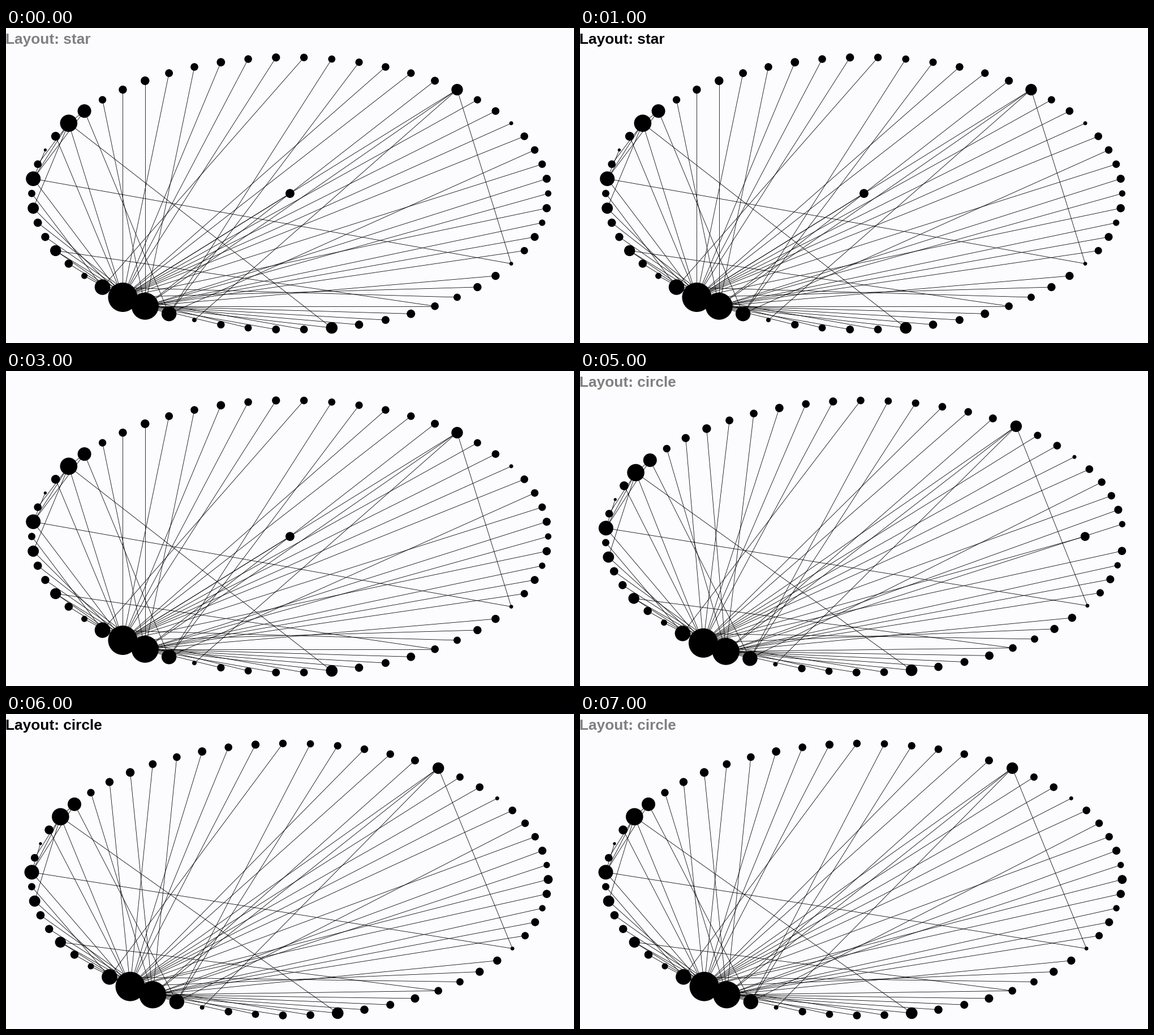
A matplotlib script for the animation above (8000 ms loop, 1004 by 558 pixels).

```python
import matplotlib.pyplot as plt
import numpy as np
from matplotlib.animation import FuncAnimation
from matplotlib.collections import LineCollection

W, H, DPI = 1004, 558, 64
PX = 72 / DPI  # points per pixel
LEFT, RIGHT, TOP, BOTTOM = 45.5, 958.4, 52.2, 534
N, STEPS = 59, 8
MOVE_START, MOVE_STEPS = 3, 3
MAIN, SECOND = 38, 39  # the two big hubs

# Every node hangs on the main hub unless it belongs to one of these.
BRANCHES = {
    SECOND: [1, 2, 10, 19, 21, 23, 32, 33, 40, 42, 44, *range(46, 51), *range(53, 58)],
    40: [4, 13, 14, 24],
    37: [15, 30, 51],
    29: [27, 54],
    25: [28],
    9: [41],
}
CROSS_LINKS = [(24, 29), (24, 25), (25, 29), (25, 31), (25, 46),
               (9, 54), (34, 50), (9, SECOND), (34, SECOND)]

# Nodes that stand out in size; the rest vary around a common radius.
KEY_RADII = {MAIN: 26, SECOND: 24, 25: 15.3, 37: 13.8, 40: 13.2, 29: 13, 24: 12,
             46: 10.3, 9: 10.2, 31: 9.9, 34: 9.7, 41: 4, 6: 3.5, 54: 3.4, 27: 2.7}


def build_edges():
    parent = {node: MAIN for node in range(N) if node != MAIN}
    for hub, members in BRANCHES.items():
        parent.update((node, hub) for node in members)
    return np.array([*parent.items(), *CROSS_LINKS])


def build_radii():
    radii = np.random.default_rng(3).normal(6.9, 0.5, N)
    radii[list(KEY_RADII)] = list(KEY_RADII.values())
    return radii


def ring(count):
    angle = 2 * np.pi * np.arange(count) / count
    return np.column_stack([np.cos(angle), np.sin(angle)])


STAR = np.vstack([[0, 0], ring(N - 1)])
CIRCLE = ring(N)


def cubic_in_out(t):
    return 4 * t**3 if t < 0.5 else 1 - 4 * (1 - t)**3


def layout(step):
    """Blend the two layouts, then stretch the result to fill the stage."""
    t = cubic_in_out(np.clip((step - MOVE_START) / MOVE_STEPS, 0, 1))
    points = STAR + t * (CIRCLE - STAR)
    low, high = points.min(axis=0), points.max(axis=0)
    return [LEFT, BOTTOM] + (points - low) / (high - low) * [RIGHT - LEFT, TOP - BOTTOM]


def title_style(step):
    """Each title lasts three steps: half faded, full, half faded."""
    for name, first in (("star", 0), ("circle", 5)):
        if first <= step < first + 3:
            return f"Layout: {name}", "black" if step == first + 1 else "0.5"
    return "", "black"


EDGES = build_edges()

fig = plt.figure(figsize=(W / DPI, H / DPI), dpi=DPI, facecolor="#fcfcfe")
ax = fig.add_axes([0, 0, 1, 1])
ax.set(xlim=(0, W), ylim=(H, 0))
ax.axis("off")

start = layout(0)
lines = LineCollection(start[EDGES], colors="black", linewidths=0.8 * PX, zorder=1)
ax.add_collection(lines, autolim=False)
nodes = ax.scatter(*start.T, s=(2 * build_radii() * PX)**2, c="black",
                   linewidths=0, zorder=2)
title = ax.text(-1, 28, "", family="Liberation Sans", weight="bold",
                size=26.3 * PX, va="baseline")


def draw(step):
    points = layout(step)
    lines.set_segments(points[EDGES])
    nodes.set_offsets(points)
    text, color = title_style(step)
    title.set(text=text, color=color)
    return lines, nodes, title


anim = FuncAnimation(fig, draw, frames=STEPS, interval=1000,
                     repeat=True, repeat_delay=0)
plt.show()
```
